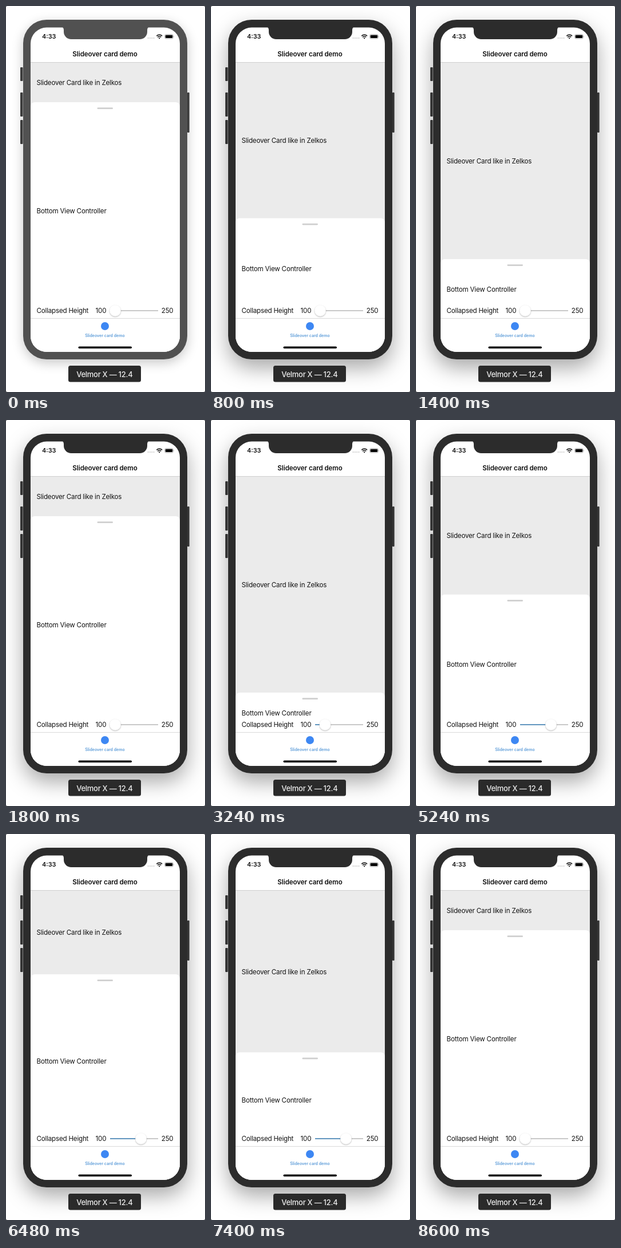
Write an HTML page that moves like this. It is 348 px wide and 674 px high and loops after 8680 ms.

```html
<!DOCTYPE html>
<html lang="en">
<head>
<meta charset="utf-8">
<title>Slideover card demo</title>
<style>
  html, body { margin: 0; width: 100%; height: 100%; overflow: hidden; background: #fff; }
  body { position: relative; --case: #2c2c2c; --button: #343434; --shadow: 0 15px 36px rgba(0, 0, 0, .34); }
  body.inactive { --case: #515151; --button: #3c3c3c; --shadow: 0 6px 20px rgba(0, 0, 0, .22); }
  #phone {
    position: absolute; left: 29.5px; top: 24px; width: 287.5px; height: 593px;
    border-radius: 41px; background: var(--case); box-shadow: var(--shadow);
  }
  svg { position: absolute; left: 0; top: 0; display: block; }
  text { font: 11.6px Inter, sans-serif; letter-spacing: -.017em; fill: #111; }
  .middle { text-anchor: middle; }
  .title { font-weight: 600; letter-spacing: -.008em; }
  .clock { font-size: 10.8px; font-weight: 600; letter-spacing: 0; }
  .tab { font-size: 7px; font-weight: 600; letter-spacing: 0; fill: #5b9bd8; }
  .device { font-size: 13px; font-weight: 500; letter-spacing: -.02em; fill: #ededed; }
  .case { fill: var(--case); }
  .buttons { fill: var(--button); }
  .thumb { fill: #fff; filter: drop-shadow(0 1.5px 1px rgba(0, 0, 0, .28)); }
</style>
</head>
<body class="inactive">
<div id="phone"></div>
<svg width="348" height="674" viewBox="0 0 348 674">
  <defs><clipPath id="screen"><rect x="43" y="37.5" width="261" height="566.5" rx="28"/></clipPath></defs>
  <g class="buttons">
    <rect x="25" y="107" width="4.5" height="24" rx="1"/>
    <rect x="25" y="151" width="4.5" height="42" rx="1"/>
    <rect x="25" y="199" width="4.5" height="42" rx="1"/>
    <rect x="317" y="151" width="3.7" height="70" rx="1"/>
  </g>

  <g clip-path="url(#screen)">
    <rect x="42" y="37" width="263" height="567" fill="#fff"/>
    <rect x="42" y="98" width="263" height="448" fill="#ebebeb"/>
    <rect x="42" y="98" width="263" height="1" fill="#cfcfcf"/>
    <text id="topLabel" x="53.5">Slideover Card like in Zelkos</text>
    <g id="card">
      <rect x="43" width="261" height="500" rx="7" fill="#fff"/>
      <rect x="159.5" y="9.3" width="27.5" height="2.8" rx="1.4" fill="#cfcfcf"/>
    </g>
    <text id="bottomLabel" x="53.5">Bottom View Controller</text>

    <text x="53.5" y="536.2">Collapsed Height</text>
    <text x="156.5" y="536.2">100</text>
    <text x="271.8" y="536.2">250</text>
    <path d="M182 532H266" stroke="#b7b7b7" stroke-width="1.5"/>
    <path id="fill" stroke="#3f86bd" stroke-width="1.5"/>
    <circle id="thumb" class="thumb" cy="532" r="9.8"/>

    <rect x="42" y="545" width="263" height="60" fill="#fff"/>
    <rect x="42" y="545" width="263" height="1" fill="#dadada"/>
    <circle cx="173" cy="559" r="7" fill="#3d87f3"/>
    <text class="tab middle" x="173" y="577.5">Slideover card demo</text>
    <rect x="126.5" y="594.5" width="93.5" height="3.4" rx="1.7"/>
  </g>

  <path class="case" d="M95 36q6 0 6 6v3a13 13 0 0 0 13 13h120a13 13 0 0 0 13-13v-3q0-6 6-6z"/>
  <text class="clock" x="63" y="57.3">4:33</text>
  <text class="title middle" x="173" y="87.6">Slideover card demo</text>
  <path d="M248.6 56h11" stroke="#c4c4c4" stroke-width="2" stroke-linecap="round" stroke-dasharray="0 3.3"/>
  <g fill="none" stroke="#000" stroke-width="1.5">
    <path d="M263.3 52.3a7 7 0 0 1 9.8 0M265.2 54.4a4.3 4.3 0 0 1 6 0"/>
    <path d="M268.2 57.4l-1.5-1.5a2.1 2.1 0 0 1 3 0z" fill="#000" stroke="none"/>
  </g>
  <rect x="277.6" y="49.6" width="14.8" height="7.6" rx="2.2" fill="none" stroke="#999" stroke-width=".7"/>
  <rect x="278.7" y="50.7" width="12.6" height="5.4" rx="1.3"/>
  <path d="M293.4 52.2q1.3 1.2 0 2.5z" fill="#999"/>

  <rect x="109" y="628" width="127" height="28.5" rx="3.5" fill="#2a2a2a"/>
  <text class="device middle" x="172.3" y="647.6">Velmor X — 12.4</text>
  <path d="M0 0h2L0 2zM348 0v2l-2-2zM0 674v-2l2 2zM348 674h-2l2-2z" fill="#8a8a8a"/>
</svg>
<script>
const LOOP = 8680, TICK = 40;
const EXPANDED = 168, COLLAPSED = 476, RAISED = 404;
const $ = id => document.getElementById(id);

const damped = x => 1 - (1 + 7 * x) * Math.exp(-7 * x);
const spring = u => damped(u) / damped(1);
const smooth = u => u * u * (3 - 2 * u);
const drag = u => u ** 2.4;

// Each move: start, end, destination, easing
const cardMoves = [
  [120, 920, 467, drag],
  [920, 1080, COLLAPSED, spring],
  [1365, 1800, EXPANDED, spring],
  [2365, 2800, COLLAPSED, spring],
  [4565, 4920, RAISED, spring],
  [5158, 5560, EXPANDED, spring],
  [6445, 6680, 441, spring],
  [6680, 6840, RAISED, smooth],
  [7368, 7800, EXPANDED, spring],
];
const thumbMoves = [
  [3200, 3240, 199.5, smooth],
  [3360, 3840, 236, smooth],
  [8280, 8600, 191, smooth],
];

function valueAt(t, value, moves) {
  for (const [start, end, target, ease] of moves) {
    if (t <= start) break;
    value += (target - value) * ease(Math.min(1, (t - start) / (end - start)));
  }
  return value;
}

function draw(now) {
  const t = Math.floor(now % LOOP / TICK) * TICK;
  const top = valueAt(t, EXPANDED, cardMoves);
  const thumb = valueAt(t, 191, thumbMoves);
  document.body.classList.toggle('inactive', t < 80);
  $('card').setAttribute('transform', `translate(0 ${top.toFixed(1)})`);
  $('topLabel').setAttribute('y', (99 + top) / 2 + 4.4);
  $('bottomLabel').setAttribute('y', (548 + top) / 2 + 4.2);
  $('thumb').setAttribute('cx', thumb);
  $('fill').setAttribute('d', `M182 532H${thumb}`);
}

const begin = performance.now();
function frame() {
  draw(performance.now() - begin);
  requestAnimationFrame(frame);
}
frame();
</script>
</body>
</html>
```
